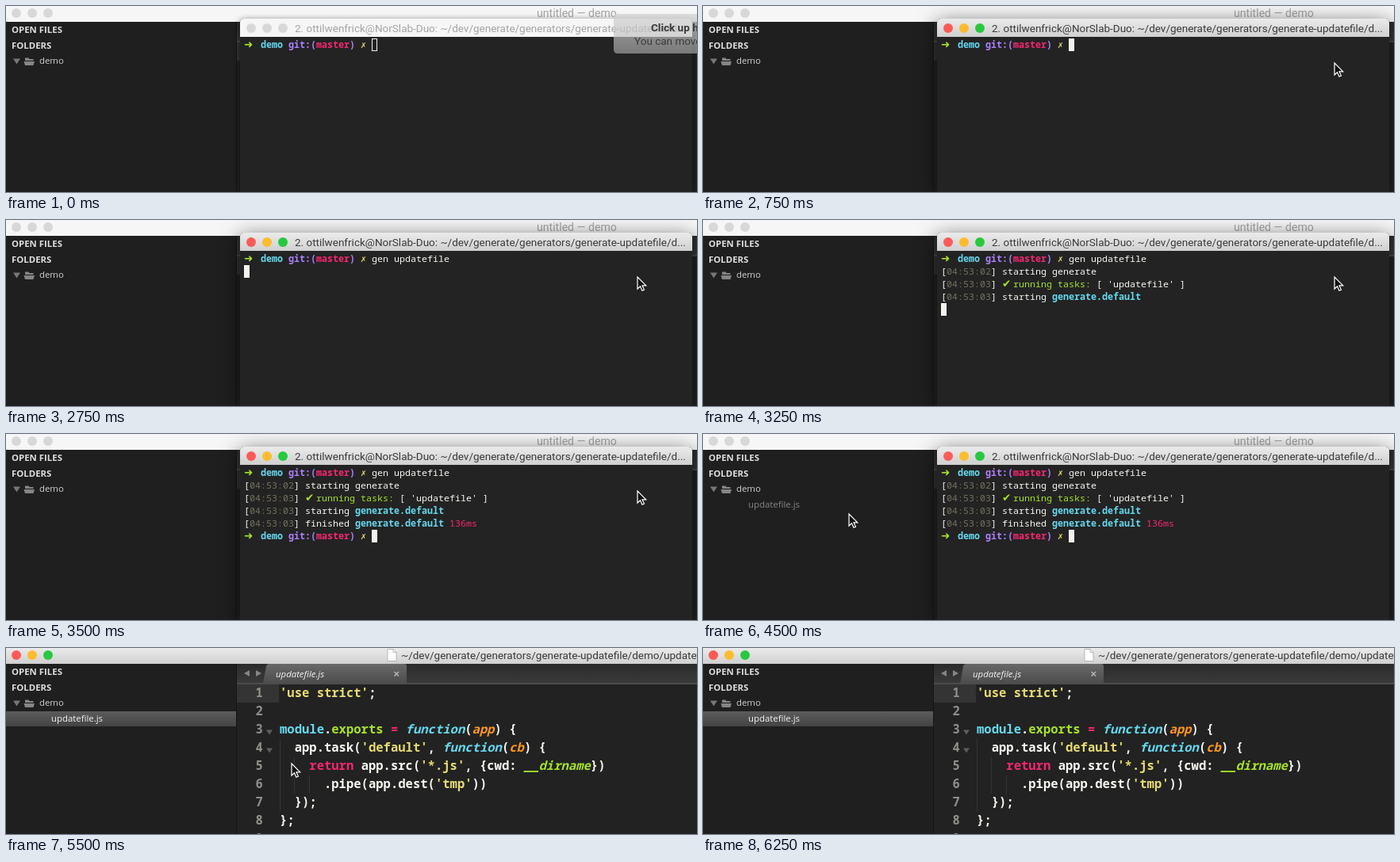
Recreate the animation shown at these times as an HTML page. Size 871 by 235 pixels, loop 6.5 s.

```html
<!DOCTYPE html>
<html lang="en">
<head>
<meta charset="utf-8">
<title>Terminal generator demo</title>
<style>
html, body { margin: 0; width: 100%; height: 100%; overflow: hidden; background: #1f1f1f; }
svg { display: block; width: 871px; height: 235px; }
text { white-space: pre; fill: #f8f8f2; }
.ui { font-family: "Open Sans", "Noto Sans", sans-serif; font-size: 11.4px; fill: #d0d0d0; }
.head { font-weight: 700; fill: #dedede; }
.bar { font-family: Roboto, Inter, sans-serif; font-size: 13.5px; fill: #3a3a3a; }
.mono { font-family: "Noto Sans Mono", "DejaVu Sans Mono", monospace; }
.term { font-size: 11.667px; font-weight: 500; }
.code { font-size: 15.55px; font-weight: 600; }
.b { font-weight: 700; }
.i { font-style: italic; }
.sign { font-family: "DejaVu Sans", sans-serif; font-size: 13.5px; }
.green { fill: #a6e22e; }
.cyan { fill: #66d9ef; }
.purple { fill: #ae81ff; }
.pink { fill: #f92672; }
.yellow { fill: #e6db74; }
.orange { fill: #fd971f; }
.dim { fill: #75715e; }
.num { fill: #8f908a; }
#shadow { filter: drop-shadow(0 6px 13px rgba(0,0,0,.65)); }
.idle #shadow { filter: drop-shadow(0 2px 4px rgba(0,0,0,.6)); }
svg { --red: #fc5b57; --amber: #fdbc2e; --lime: #28c840; }
.idle { --red: #d8d8d8; --amber: #d8d8d8; --lime: #d8d8d8; }
.idle .bar { fill: #a4a4a4; }
.idle .face { fill: #f6f6f6; }
</style>
</head>
<body>
<svg viewBox="0 0 871 235" xmlns="http://www.w3.org/2000/svg">
  <defs>
    <linearGradient id="chrome" x2="0" y2="1"><stop stop-color="#ebebeb"/><stop offset="1" stop-color="#d0d0d0"/></linearGradient>
    <linearGradient id="strip" x2="0" y2="1"><stop stop-color="#2b2b2b"/><stop offset="1" stop-color="#3a3a3a"/></linearGradient>
    <linearGradient id="pick" x2="0" y2="1"><stop stop-color="#5c5c5c"/><stop offset="1" stop-color="#434343"/></linearGradient>
    <linearGradient id="tabFill" x2="0" y2="1"><stop stop-color="#686868"/><stop offset="1" stop-color="#4c4c4c"/></linearGradient>
    <linearGradient id="glass" x2="0" y2="1"><stop stop-color="#d2d2d2" stop-opacity=".75"/><stop offset="1" stop-color="#b4b4b4" stop-opacity=".6"/></linearGradient>
    <g id="lights">
      <circle r="6" style="fill:var(--red)"/>
      <circle cx="20" r="6" style="fill:var(--amber)"/>
      <circle cx="40" r="6" style="fill:var(--lime)"/>
    </g>
  </defs>

  <rect width="871" height="235" fill="#1f1f1f"/>
  <rect x="291" y="20" width="580" height="215" fill="#222"/>
  <rect x="291" y="20" width="580" height="24" fill="url(#strip)"/>
  <rect x="291" y="44" width="580" height="2" fill="#4c4c4c"/>
  <rect x="291" y="46" width="53" height="23" fill="#343434"/>
  <rect x="290" y="20" width="1" height="215" fill="#151515"/>

  <g id="frame">
    <rect class="face" width="871" height="20" fill="url(#chrome)"/>
    <use href="#lights" x="13" y="9"/>
    <text id="idleTitle" class="bar" x="669" y="14" style="font-size:14.1px">untitled — demo</text>
    <g id="fileTitle">
      <path d="M481 1.5h7l4 4v11h-11z" fill="#fff" stroke="#aaa" stroke-width=".8"/>
      <path d="M488 1.5v4h4" fill="none" stroke="#aaa" stroke-width=".8"/>
      <text class="bar" x="498" y="14">~/dev/generate/generators/generate-updatefile/demo/updatefile.js</text>
    </g>
  </g>

  <rect id="pickRow" y="80" width="290" height="19" fill="url(#pick)"/>
  <text class="ui head" x="7" y="34">OPEN FILES</text>
  <text class="ui head" x="7" y="54">FOLDERS</text>
  <path d="M9 66.500h9l-4.500 7z" fill="#777"/>
  <path d="M24 69v-3.500h4.500l1 1.500h5v2zM22.500 70h13.500l-1.500 5h-10.500z" fill="#858585"/>
  <text class="ui" x="42" y="73">demo</text>
  <text id="file" class="ui" x="57" y="93">updatefile.js</text>

  <g id="editor">
    <path d="M307 28v8l-7-4zM315 28v8l7-4z" fill="#858585"/>
    <path d="M327 43.500H505" stroke="#222"/>
    <g id="tab">
      <path d="M324 45l4-22q1-3 4-3h170q3 0 3 3v22z" fill="url(#tabFill)"/>
      <text class="ui i" x="340" y="37" style="fill:#f4f4f4">updatefile.js</text>
      <path d="M489.500 30l5.500 5.500m0-5.500l-5.500 5.500" stroke="#b5b5b5" stroke-width="1.600"/>
    </g>
    <path d="M345.500 115v92M363.500 138v46M382.500 161v23" stroke="#343434"/>
    <path d="M328 103.500h8l-4 6zM328 126.500h8l-4 6z" fill="#5d5d5d"/>
    <g id="code"></g>
    <rect id="caret" x="344.500" y="49" width="1.500" height="20" fill="#f8f8f0"/>
  </g>

  <g id="terminal">
    <path id="shadow" d="M295 235V21q0-5 5-5h560q5 0 5 5v214z" fill="#232323"/>
    <path class="face" d="M295 39V21q0-5 5-5h560q5 0 5 5v18z" fill="url(#chrome)"/>
    <use href="#lights" x="309" y="28"/>
    <text class="bar" x="364" y="33">2. ottilwenfrick@NorSlab-Duo: ~/dev/generate/generators/generate-updatefile/d...</text>
    <g id="log"></g>
    <text id="typed" class="mono term" x="461" y="53"></text>
    <rect id="block"/>
  </g>

  <g id="hint">
    <path d="M871 10H771q-5 0-5 5v40q0 5 5 5h100z" fill="url(#glass)"/>
    <text class="bar" x="813" y="32" style="font-weight:700">Click up here</text>
    <text class="bar" x="792" y="49">You can move</text>
  </g>

  <path id="mouse" d="M0 0v15l3.500-3.300 2.400 5.500 2.500-1.100-2.400-5.300h4.700z" fill="#111" stroke="#fff" stroke-width="1.200"/>
</svg>
<script>
const LOOP = 6500, STEP = 250;
const SVG = 'http://www.w3.org/2000/svg';
const $ = id => document.getElementById(id);
const show = (id, on) => { $(id).style.display = on ? '' : 'none'; };

function make(parent, tag, attrs = {}) {
  const el = document.createElementNS(SVG, tag);
  setAll(el, attrs);
  parent.append(el);
  return el;
}

function setAll(el, attrs) {
  for (const name in attrs) el.setAttribute(name, attrs[name]);
}

function put(parent, text, x, y, cls) {
  make(parent, 'text', { x, y, class: 'mono ' + cls }).textContent = text;
}

// Lays [text, class] pairs on a character grid.
function putLine(parent, parts, x, y, cell, base) {
  let col = 0;
  for (const [text, cls = ''] of parts) {
    if (text.trim()) put(parent, text, x + col * cell, y, base + ' ' + cls);
    col += text.length;
  }
}

const prompt = [['➜', 'green sign b'], ['  '], ['demo', 'cyan b'], [' '], ['git:(', 'purple b'],
  ['master', 'pink b'], [')', 'purple b'], [' '], ['✗', 'yellow b']];
const stamp = s => [['['], ['04:53:' + s, 'dim'], ['] ']];
const logLines = [
  prompt,
  [...stamp('02'), ['starting generate']],
  [...stamp('03'), ['✔', 'green sign'], [' '], ['running tasks:', 'green'], [" [ 'updatefile' ]"]],
  [...stamp('03'), ['starting '], ['generate.default', 'cyan b']],
  [...stamp('03'), ['finished '], ['generate.default', 'cyan b'], [' '], ['136ms', 'pink']],
  prompt
];
const rows = logLines.map((parts, i) => {
  const g = make($('log'), 'g');
  putLine(g, parts, 300, 53 + i * 16, 7, 'term');
  return g;
});

const codeLines = [
  [["'use strict'", 'yellow'], [';']],
  [],
  [['module', 'cyan'], ['.'], ['exports', 'green'], [' '], ['=', 'pink'], [' '],
    ['function', 'cyan i'], ['('], ['app', 'orange i'], [') {']],
  [['  '], ['app.task('], ["'default'", 'yellow'], [', '], ['function', 'cyan i'], ['('],
    ['cb', 'orange i'], [') {']],
  [['    '], ['return', 'pink'], [' '], ['app.src('], ["'*.js'", 'yellow'], [', '], ['{cwd: '],
    ['__dirname', 'green i'], ['})']],
  [['      '], ['.pipe(app.dest('], ["'tmp'", 'yellow'], ['))']],
  [['  '], ['});']],
  [['};']],
  []
];
codeLines.forEach((parts, i) => {
  const y = 62 + i * 23;
  put($('code'), i + 1, 314.5, y, 'code num');
  putLine($('code'), parts, 345, y, 9.33, 'code');
});

// Value of the last [time, value] entry already reached.
const at = (keys, t) => keys.reduce((v, [k, next]) => t >= k ? next : v, keys[0][1]);

const typedCount = [[0, 0], [1000, 1], [1250, 3], [1500, 5], [1750, 7], [2000, 9], [2250, 12], [2500, 14]];
const rowCount = [[0, 1], [3000, 2], [3250, 4], [3500, 6]];
const mousePath = [[0, null], [500, [796, 72]], [3750, [715, 76]], [4000, [430, 92]],
  [4250, [190, 101]], [4500, [184, 101]], [5500, [360, 146]], [5750, [554, 186]], [6000, null]];

function draw(now) {
  const t = Math.floor(now % LOOP / STEP) * STEP;
  const idle = t < 500, editing = t >= 4750;

  show('terminal', !editing);
  show('editor', editing);
  show('pickRow', editing);
  show('idleTitle', !editing);
  show('fileTitle', editing);
  $('frame').setAttribute('class', editing ? '' : 'idle');
  $('terminal').setAttribute('class', idle ? 'idle' : '');

  show('file', t >= 3750);
  $('file').style.fill = editing ? '#f2f2f2' : '#858585';
  show('tab', t >= 5000);
  show('caret', editing && (t - 4750) % 1000 < 500);

  show('hint', idle);
  $('hint').style.opacity = t < 250 ? 1 : 0.45;

  const typed = at(typedCount, t), count = at(rowCount, t);
  $('typed').textContent = 'gen updatefile'.slice(0, typed);
  rows.forEach((row, i) => { row.style.display = i < count ? '' : 'none'; });

  const running = t >= 2750 && t < 3500;
  const col = running ? 0 : t < 2750 ? 23 + typed : 23;
  const line = running ? count : count - 1;
  const inset = idle ? 0.5 : 0;
  setAll($('block'), {
    x: 300 + col * 7 + inset,
    y: 41 + line * 16 + inset,
    width: 7 - 2 * inset,
    height: 16 - 2 * inset,
    fill: idle ? 'none' : '#f4f4ee',
    stroke: idle ? '#f4f4ee' : 'none'
  });

  const pos = at(mousePath, t);
  show('mouse', pos);
  if (pos) $('mouse').setAttribute('transform', `translate(${pos})`);
}

const start = performance.now();
function tick() {
  draw(performance.now() - start);
  requestAnimationFrame(tick);
}
tick();
</script>
</body>
</html>
```
